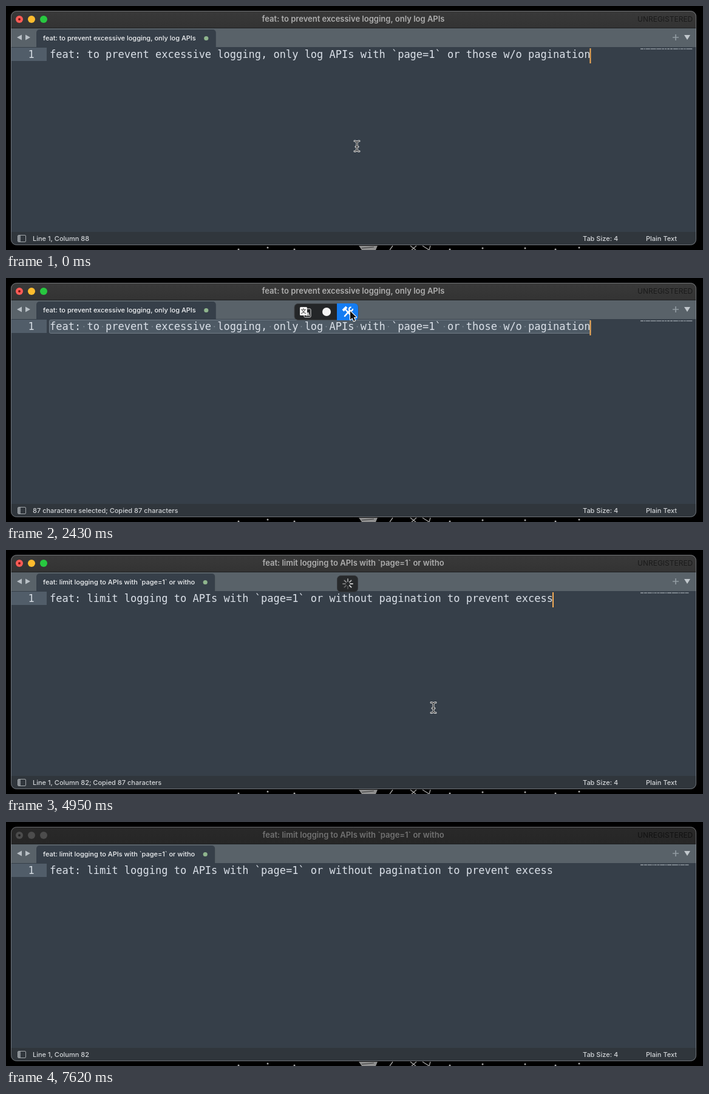
An HTML page with a canvas that plays this animation: 1148x404 px, repeating every 7650 ms.

```html
<!DOCTYPE html>
<html lang="en">
<head>
<meta charset="utf-8">
<title>Commit message editor</title>
<style>
html, body { margin: 0; width: 100%; height: 100%; overflow: hidden; background: #000; }
canvas { display: block; width: 1148px; height: 404px; }
</style>
</head>
<body>
<canvas id="stage"></canvas>
<script>
const W = 1148, H = 404, LOOP = 7650;
const canvas = document.getElementById('stage');
const ctx = canvas.getContext('2d');
const dpr = window.devicePixelRatio || 1;
canvas.width = W * dpr;
canvas.height = H * dpr;

const UI = 'Inter, "Open Sans", sans-serif';
const CODE = '17px "DejaVu Sans Mono", monospace';
const BEFORE = 'feat: to prevent excessive logging, only log APIs with `page=1` or those w/o pagination';
const AFTER = 'feat: limit logging to APIs with `page=1` or without pagination to prevent excess';

// Moments of the story, in ms
const SELECT = 1500, MENU = 1740, RUN = 2600, PASTE = 4700;
const DONE = 5100, GONE = 5190, CLEAR = 5700, BLUR = 7080;

// Pointer stops: time, x, y
const PATH = [
  [420, 578, 232], [1230, 528, 86], [1780, 528, 86], [2300, 566, 54],
  [2650, 566, 54], [3000, 568, 50], [3750, 568, 50], [4450, 704, 261],
  [5400, 704, 261], [6060, 270, 10], [6150, 262, -24]
];

const clamp = v => Math.max(0, Math.min(1, v));
const ease = v => v * v * (3 - 2 * v);

function pointerAt(t) {
  if (t <= PATH[0][0]) return PATH[0].slice(1);
  for (let i = 1; i < PATH.length; i++) {
    const [t0, x0, y0] = PATH[i - 1], [t1, x1, y1] = PATH[i];
    if (t <= t1) {
      const k = ease((t - t0) / (t1 - t0));
      return [x0 + (x1 - x0) * k, y0 + (y1 - y0) * k];
    }
  }
  return PATH[PATH.length - 1].slice(1);
}

function rect(x, y, w, h, fill) {
  ctx.fillStyle = fill;
  ctx.fillRect(x, y, w, h);
}

function round(x, y, w, h, r, fill, stroke) {
  ctx.beginPath();
  ctx.roundRect(x, y, w, h, r);
  if (fill) { ctx.fillStyle = fill; ctx.fill(); }
  if (stroke) { ctx.strokeStyle = stroke; ctx.lineWidth = 1; ctx.stroke(); }
}

function disc(x, y, r, fill) {
  ctx.beginPath();
  ctx.arc(x, y, r, 0, 7);
  ctx.fillStyle = fill;
  ctx.fill();
}

function poly(points, fill) {
  ctx.beginPath();
  points.forEach(([x, y]) => ctx.lineTo(x, y));
  ctx.closePath();
  ctx.fillStyle = fill;
  ctx.fill();
}

function line(x0, y0, x1, y1, color, width) {
  ctx.beginPath();
  ctx.moveTo(x0, y0);
  ctx.lineTo(x1, y1);
  ctx.strokeStyle = color;
  ctx.lineWidth = width;
  ctx.stroke();
}

function text(str, x, y, font, color, align = 'left') {
  ctx.font = font;
  ctx.fillStyle = color;
  ctx.textAlign = align;
  ctx.fillText(str, x, y);
  return ctx.measureText(str).width;
}

function wallpaper() {
  rect(0, 0, W, H, '#000');
  const gray = '#a9a9a9';
  for (const [x, y] of [[383, 403], [431, 400], [475, 403], [731, 403], [785, 401], [855, 401], [905, 403], [944, 400]])
    disc(x, y, 1.5, gray);
  poly([[581, 397], [612, 397], [609, 404], [586, 404]], '#8f8f8f');
  line(586, 401, 606, 399, '#3a3a3a', 1);
  for (const [x0, x1] of [[637, 632], [666, 675], [676, 668], [686, 697], [699, 697]])
    line(x0, 397, x1, 404, gray, 1.3);
}

function titleBar(title, focused) {
  const g = ctx.createLinearGradient(0, 9, 0, 37);
  g.addColorStop(0, focused ? '#393939' : '#292929');
  g.addColorStop(1, focused ? '#333' : '#262626');
  rect(8, 8, 1129, 29, g);
  rect(8, 36, 1129, 1, '#1d1f21');
  const lights = focused ? ['#ff5c56', '#fdbc2e', '#28c840'] : ['#4c4c4c', '#4c4c4c', '#4c4c4c'];
  lights.forEach((c, i) => disc(22 + 20 * i, 22, 6, c));
  disc(22, 22, 2, focused ? '#7c130f' : '#222');
  text(title, 572, 26, '600 13px ' + UI, focused ? '#aeaeae' : '#727272', 'center');
  text('UNREGISTERED', 1040, 26, '12px ' + UI, focused ? '#1a1a1a' : '#111');
}

function tabBar(title) {
  rect(8, 37, 1129, 31, '#596269');
  const ink = '#b8bfc5';
  poly([[18, 52], [26, 47.5], [26, 56.5]], ink);
  poly([[40, 52], [32, 47.5], [32, 56.5]], ink);
  ctx.font = '500 11px ' + UI;
  const w = ctx.measureText(title).width;
  round(50, 39, w + 44, 30, [5, 5, 0, 0], '#363f49');
  text(title, 61, 57, '500 11px ' + UI, '#f0f2f4');
  disc(61 + w + 17, 53.5, 3.6, '#8fb58d');
  line(1098, 52, 1108, 52, '#929ba2', 1.7);
  line(1103, 47, 1103, 57, '#929ba2', 1.7);
  poly([[1117, 48], [1127, 48], [1122, 56]], '#c2c8cd');
}

function editor(str, selected, focused) {
  rect(8, 68, 1129, 307, '#363f49');
  rect(9, 69, 58, 22, '#515d69');
  ctx.font = CODE;
  const cell = ctx.measureText('m').width;
  const end = 72 + cell * str.length;
  if (selected) round(71.5, 69.5, end - 71, 22, 2, '#4e5a65', '#717c86');
  text('1', 36.5, 86, CODE, '#d3dae1');
  text(str, 72, 86, CODE, '#dbe1e9');
  [...str].forEach((ch, i) => {
    if (ch !== ' ') rect(1045 + i * 0.98, 70, 1, 2, 'rgba(205,213,220,.5)');
    else if (selected) disc(72 + (i + .5) * cell, 80.5, 1, '#7d8892');
  });
  if (focused) rect(end - 1, 70, 2, 25, '#f5ac56');
}

function statusBar(str) {
  rect(8, 374, 1129, 22, '#30363c');
  round(19.5, 379.5, 13, 11, 1.5, null, '#a2a7ab');
  rect(20, 380, 4, 10, '#858b90');
  const font = '500 11px ' + UI;
  text(str, 44, 389, font, '#d2d5d8');
  text('Tab Size: 4', 950, 389, font, '#d2d5d8');
  text('Plain Text', 1054, 389, font, '#d2d5d8');
}

function translateIcon(x, y) {
  round(x - 2, y - 5, 11, 14, 1.5, null, '#e8e8e8');
  round(x - 9, y - 8, 12, 14, 1.5, '#f2f2f2');
  text('文', x - 3, y + 2, '9px "Noto Sans CJK SC", "Noto Sans CJK JP", sans-serif', '#242424', 'center');
  text('A', x + 4.5, y + 7, '700 8px ' + UI, '#f2f2f2', 'center');
}

function toolsIcon(x, y) {
  ctx.save();
  ctx.translate(x, y);
  ctx.lineCap = 'round';
  line(-5, 7, 3, -2, '#fff', 2.6);
  line(-4, -4, 6, 7, '#fff', 2.6);
  ctx.lineCap = 'butt';
  line(-8, -2, -2, -8, '#fff', 4);
  ctx.beginPath();
  ctx.arc(5, -4.5, 3, -.2, 4.9);
  ctx.strokeStyle = '#fff';
  ctx.lineWidth = 2.2;
  ctx.stroke();
  ctx.restore();
}

function menu(t, x, y) {
  ctx.globalAlpha = clamp((t - MENU) / 120);
  round(475, 42.5, 105, 27, 6, '#242628', '#404346');
  if (y > 42 && y < 70 && x >= 475 && x < 580) {
    const cell = Math.floor((x - 475) / 35);
    round(475 + 35 * cell, 42, 35, 28, [cell ? 0 : 6, cell > 1 ? 6 : 0, cell > 1 ? 6 : 0, cell ? 0 : 6], '#147cf2');
  }
  translateIcon(493, 56);
  disc(528, 56, 7, '#f4f4f4');
  toolsIcon(563, 56);
  ctx.globalAlpha = 1;
}

function spinner(t) {
  ctx.globalAlpha = 1 - clamp((t - DONE) / (GONE - DONE));
  round(545.5, 42.5, 34, 27, 6, '#27292b', '#36393c');
  const head = Math.floor(t / 100) % 8;
  ctx.lineCap = 'round';
  for (let i = 0; i < 8; i++) {
    const a = i * Math.PI / 4, age = (head - i + 8) % 8;
    const c = Math.cos(a), s = Math.sin(a);
    line(563 + 4 * c, 56 + 4 * s, 563 + 8 * c, 56 + 8 * s, `rgba(235,235,235,${.9 - age * .095})`, 1.8);
  }
  ctx.lineCap = 'butt';
  ctx.globalAlpha = 1;
}

function outlined(path) {
  ctx.lineJoin = 'round';
  ctx.strokeStyle = '#f4f4f4';
  ctx.lineWidth = 2.4;
  ctx.stroke(path);
  ctx.fillStyle = '#111';
  ctx.fill(path);
}

function pointer(x, y) {
  ctx.save();
  ctx.translate(x, y);
  if (y < 67) {
    outlined(new Path2D('M1 1V15L4.3 11.9L6.7 17.3L9 16.3L6.7 11H11Z'));
  } else {
    const beam = new Path2D('M-4 -8.5Q-1 -8.5 0 -6.5Q1 -8.5 4 -8.5M0 -6.5V6.5M-4 8.5Q-1 8.5 0 6.5Q1 8.5 4 8.5M-2 1H2');
    ctx.lineCap = 'round';
    ctx.strokeStyle = '#f0f0f0';
    ctx.lineWidth = 3;
    ctx.stroke(beam);
    ctx.strokeStyle = '#151515';
    ctx.lineWidth = 1.2;
    ctx.stroke(beam);
  }
  ctx.restore();
}

function statusText(t, str, selected) {
  const copied = t >= SELECT && t < CLEAR ? '; Copied 87 characters' : '';
  return (selected ? '87 characters selected' : `Line 1, Column ${str.length + 1}`) + copied;
}

function draw(t) {
  const str = t < PASTE ? BEFORE : AFTER;
  const title = str.slice(0, 50).trim();
  const selected = t >= SELECT && t < PASTE;
  const focused = t < BLUR;
  const [x, y] = pointerAt(t);

  ctx.setTransform(dpr, 0, 0, dpr, 0, 0);
  wallpaper();
  ctx.save();
  ctx.beginPath();
  ctx.roundRect(8, 8, 1129, 388, 9);
  ctx.clip();
  titleBar(title, focused);
  tabBar(title);
  editor(str, selected, focused);
  statusBar(statusText(t, str, selected));
  ctx.restore();
  round(8.5, 8.5, 1128, 387, 9, null, 'rgba(160,165,170,.55)');

  if (t >= MENU && t < RUN) menu(t, x, y);
  if (t >= RUN && t < GONE) spinner(t);
  pointer(x, y);
}

const start = performance.now();
function tick() {
  draw((performance.now() - start) % LOOP);
  requestAnimationFrame(tick);
}
tick();
</script>
</body>
</html>
```
